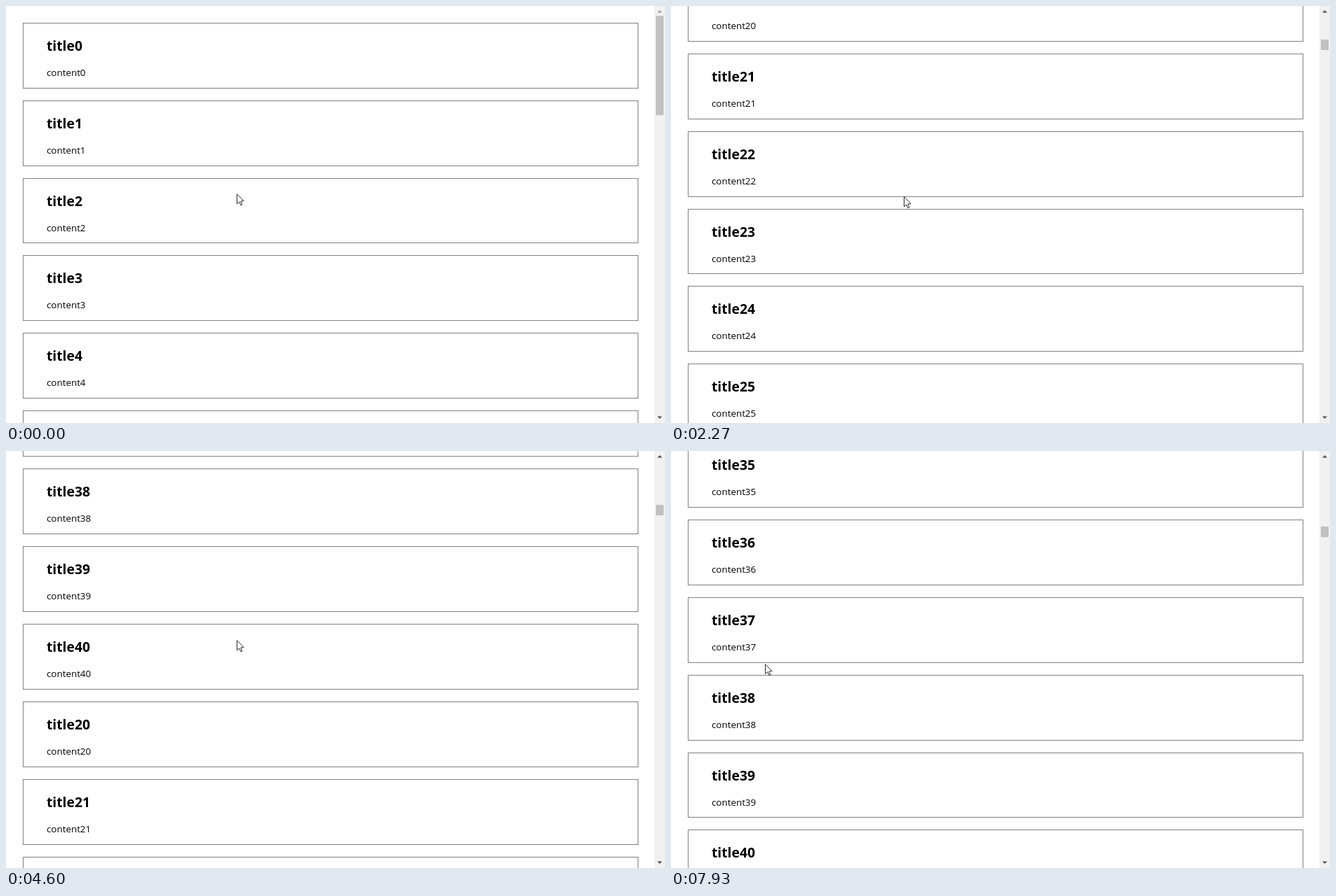
Recreate the animation shown at these times as an HTML page with a canvas. Size 940 by 596 pixels, loop 8000 ms.

```html
<!DOCTYPE html>
<html lang="en">
<head>
<meta charset="utf-8">
<title>Infinite scroll</title>
<style>
  html, body { margin: 0; width: 100%; height: 100%; overflow: hidden; background: #fff; }
  canvas { display: block; }
</style>
</head>
<body>
<canvas id="stage" width="940" height="596"></canvas>
<script>
const W = 940, H = 596, LOOP = 8000, TICK = 200 / 3;
const TOP = 23.92, PITCH = 110.83, CARD = 92.85;
const BATCH = 21, MAX_BATCHES = 15;
const TRACK = { top: 14, size: 568, minThumb: 14.5 };
const FONT = '"Open Sans", "Noto Sans", sans-serif';
const ctx = document.getElementById('stage').getContext('2d');

// Wheel flicks: start, end, distance
const FLICKS = [
  [0, 1006, 1784.9], [1733, 2267, 498.6], [2267, 2867, 1003], [3133, 3800, 830],
  [3933, 4200, 93.5], [6255, 6800, 932], [6933, 7467, 930], [7667, 7933, 171.1]
];

// Pointer tip: time, x, y
const POINTER = [
  [0, 329, 268], [930, 335, 270], [2260, 332, 272], [3460, 332, 270], [4533, 332, 270],
  [4600, 329, 270], [5000, 95, 236], [5200, 42, 300], [5400, 55, 391], [6200, 134, 304]
];

const clamp = (v, lo, hi) => Math.max(lo, Math.min(hi, v));

// Eased progress of t between a and b
function progress(t, a, b) {
  const u = clamp((t - a) / (b - a), 0, 1);
  return u * u * (3 - 2 * u);
}

function scrollAt(t) {
  return FLICKS.reduce((sum, [a, b, dist]) => sum + dist * progress(t, a, b), 0);
}

function pointerAt(t) {
  let [, x, y] = POINTER[0];
  for (let i = 1; i < POINTER.length; i++) {
    const p = progress(t, POINTER[i - 1][0], POINTER[i][0]);
    x += (POINTER[i][1] - POINTER[i - 1][1]) * p;
    y += (POINTER[i][2] - POINTER[i - 1][2]) * p;
  }
  return [x, y];
}

// Batches arrive one after another once the bottom is reached.
const batchesAt = t => clamp(Math.floor((t - 1000) / 35), 0, MAX_BATCHES);

// Every batch repeats the numbers 20 to 40.
const label = i => i < 20 ? i : 20 + (i - 20) % BATCH;

function drawCard(i, y) {
  const top = Math.round(y), bottom = Math.round(y + CARD);
  ctx.strokeStyle = '#808080';
  ctx.lineWidth = 1;
  ctx.strokeRect(24.5, top + 0.5, 877, bottom - top);
  ctx.fillStyle = '#000';
  ctx.font = 'bold 19.3px ' + FONT;
  ctx.fillText('title' + label(i), 58, Math.round(y + 40));
  ctx.font = '13.4px ' + FONT;
  ctx.fillText('content' + label(i), 58, Math.round(y + 76));
}

function polygon(points) {
  ctx.beginPath();
  points.forEach(([x, y]) => ctx.lineTo(x, y));
  ctx.closePath();
}

function drawArrow(y, dir, color) {
  ctx.fillStyle = color;
  polygon([[929, y], [936, y], [932.5, y + 3.5 * dir]]);
  ctx.fill();
}

function drawScrollbar(scroll, batches) {
  const height = 2388 + batches * BATCH * PITCH;
  const thumb = Math.max(TRACK.minThumb, TRACK.size * H / height);
  const y = TRACK.top + scroll / (height - H) * (TRACK.size - thumb);
  ctx.fillStyle = '#f1f1f1';
  ctx.fillRect(925, 0, 15, H);
  ctx.fillStyle = '#c1c1c1';
  ctx.fillRect(927, Math.round(y), 11, Math.round(thumb));
  drawArrow(9.5, -1, scroll > 0 ? '#505050' : '#a3a3a3');
  drawArrow(586.5, 1, '#505050');
}

function drawPointer([x, y]) {
  ctx.save();
  ctx.translate(Math.round(x) + 0.5, Math.round(y) + 0.8);
  polygon([[0, 0], [0, 14], [3.2, 11], [5.4, 16], [7.4, 15.2], [5.3, 10.3], [9.6, 9.8]]);
  ctx.fillStyle = '#fff';
  ctx.fill();
  ctx.strokeStyle = '#111';
  ctx.lineWidth = 0.9;
  ctx.stroke();
  ctx.restore();
}

function draw(time) {
  // The picture advances 15 times a second.
  const t = Math.floor((time % LOOP + 4) / TICK) * TICK;
  const scroll = scrollAt(t);
  const batches = batchesAt(t);
  const first = Math.max(0, Math.floor((scroll - TOP) / PITCH));
  const last = Math.min((batches + 1) * BATCH, first + 7);
  ctx.fillStyle = '#fff';
  ctx.fillRect(0, 0, W, H);
  for (let i = first; i < last; i++) drawCard(i, TOP + i * PITCH - scroll);
  drawScrollbar(scroll, batches);
  drawPointer(pointerAt(t));
}

const start = performance.now();
function frame() {
  draw(performance.now() - start);
  requestAnimationFrame(frame);
}
frame();
</script>
</body>
</html>
```
